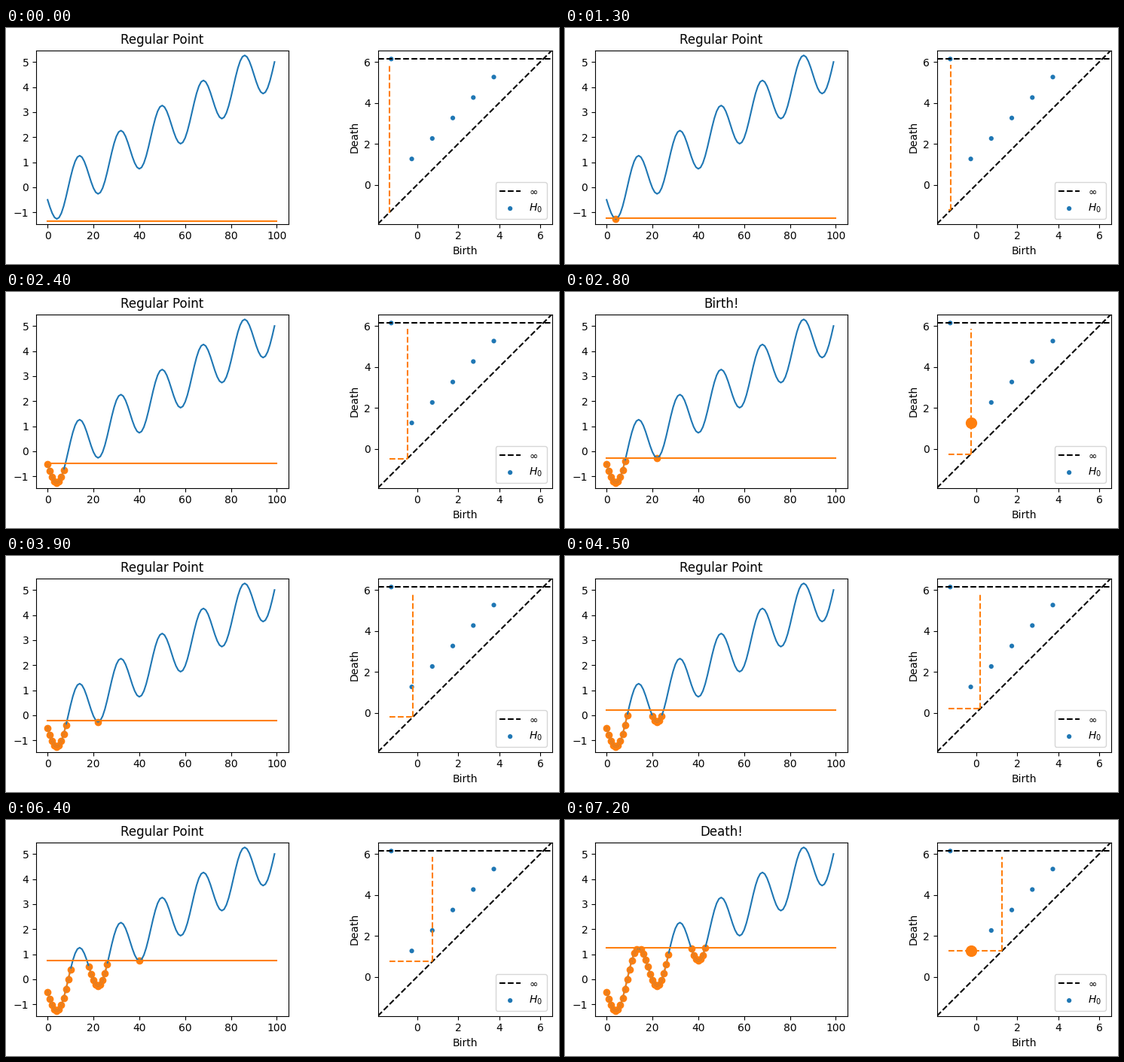
Write a matplotlib script that moves like this. It is 734 by 314 pixels and loops after 8 s.

```python
import numpy as np
import matplotlib.pyplot as plt
from matplotlib.animation import FuncAnimation

W, H = 734, 314
FRAMES, INTERVAL, HOLD = 80, 100, 11

# Rising sine wave; its extrema repeat every 18 samples
t = np.linspace(-0.5, 5, 100)
x = np.sin(2 * np.pi * t) + t
idx = np.arange(x.size)
lo, hi = x.min(), x.max()

births = x[4::18] + 1e-7  # just above each minimum, so it counts as born
deaths = x[14::18]
pairs = np.column_stack([births[1:], deaths])

# Sweep the level upwards, pausing on each critical value
critical = np.concatenate([births, deaths])
start = lo - 0.1
levels = np.unique(np.concatenate([np.linspace(start, hi + 0.1, 100), critical]))
sequence = [v for v in levels for _ in range(HOLD if v in critical else 1)][:FRAMES]

fig = plt.figure(figsize=(W / 100, H / 100), dpi=100)


def add_axes(left, width):
    return fig.add_axes([left / W, 53.28 / H, width / W, 231 / H])


# Time series
ax = add_axes(40.02, 334.66)
ax.plot(x, c="C0")
below_dots = ax.scatter([], [], c="C1")
below_line, = ax.plot([], [], c="C1")
level_line, = ax.plot([], [], c="C1")
ax.set_xlim(-5, 105)
ax.set_ylim(lo - 0.2, hi + 0.2)
title = ax.set_title("Regular Point")

# Persistence diagram
dgm = add_axes(493.58, 231)
buffer = (hi - lo) / 5
low, high = lo - buffer / 2, hi + buffer
inf_y = low + 0.95 * (high - low)
dgm.plot([low, high], [low, high], "--", c="k")
dgm.plot([low, high], [inf_y, inf_y], "--", c="k", label=r"$\infty$")
dgm.scatter(np.append(pairs[:, 0], lo), np.append(pairs[:, 1], inf_y),
            20, c="C0", edgecolor="none", label="$H_0$")
event_dot = dgm.scatter([], [], 100, c="C1")
across, = dgm.plot([], [], "--", c="C1")
upward, = dgm.plot([], [], "--", c="C1")
dgm.set_xlim(low, high)
dgm.set_ylim(low, high)
dgm.set_xticks([0, 2, 4, 6])
dgm.set_yticks([0, 2, 4, 6])
dgm.set_xlabel("Birth")
dgm.set_ylabel("Death")
dgm.legend(loc="lower right")


def update(i):
    level = sequence[i]
    below = x < level
    below_dots.set_offsets(np.column_stack([idx[below], x[below]]))
    below_line.set_data(idx, np.where(below, x, np.nan))
    level_line.set_data([0, 100], [level, level])

    across.set_data([start, level], [level, level])
    upward.set_data([level, level], [level, hi + 0.6])
    event_dot.set_offsets(pairs[(pairs == level).any(axis=1)])

    if level in births:
        title.set_text("Birth!")
    elif level in deaths:
        title.set_text("Death!")
    else:
        title.set_text("Regular Point")


anim = FuncAnimation(fig, update, frames=FRAMES, interval=INTERVAL,
                     init_func=lambda: None, repeat=True, repeat_delay=0)
plt.show()
```
